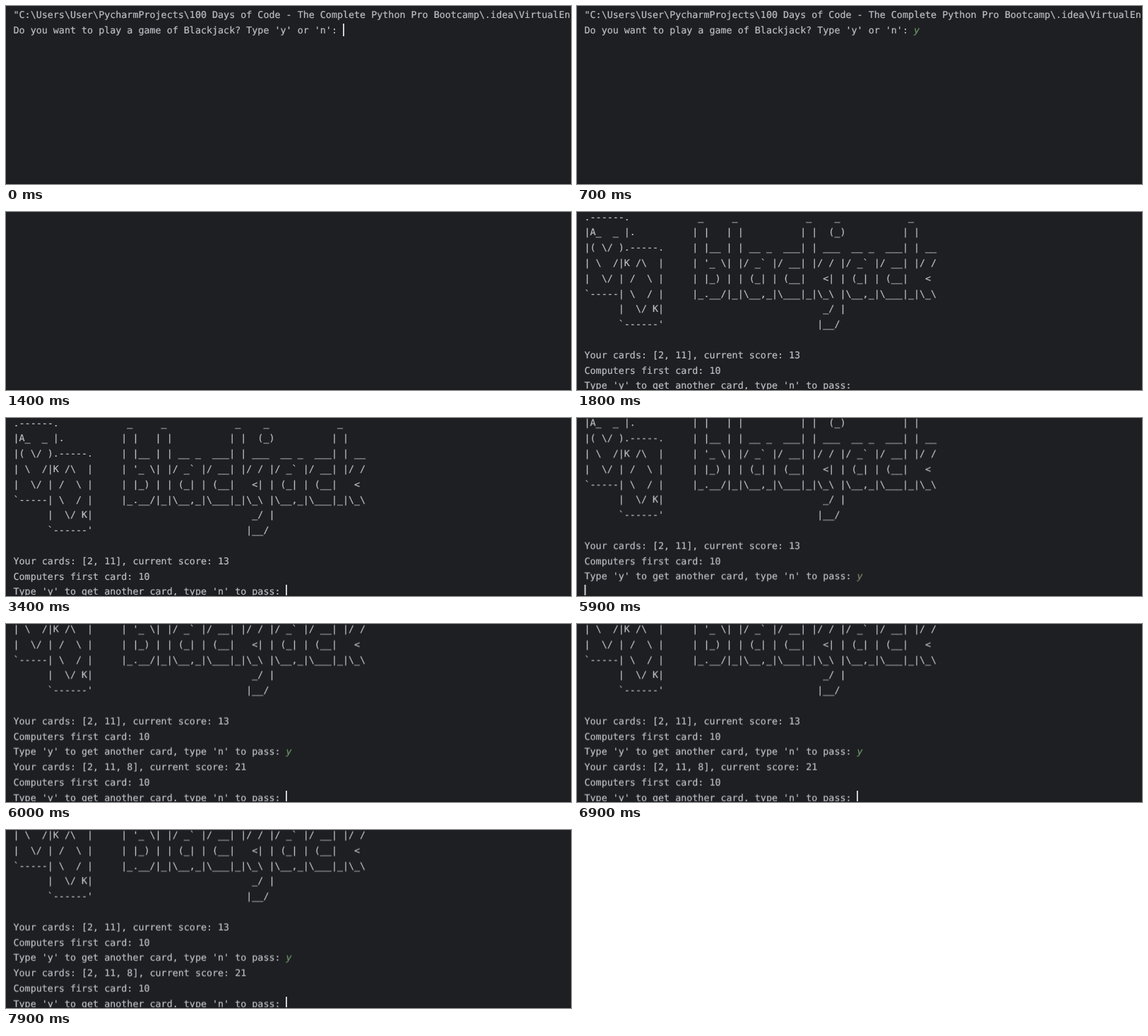
An HTML page for the animation above (8000 ms loop, 800 by 253 pixels).

```html
<!DOCTYPE html>
<html lang="en">
<head>
<meta charset="utf-8">
<title>Blackjack in a terminal</title>
<style>
  html, body {
    margin: 0;
    width: 100%;
    height: 100%;
    overflow: hidden;
    background: #1e1f22;
  }
  .stage {
    position: relative;
    width: 800px;
    height: 253px;
    overflow: hidden;
  }
  .stage::after {
    content: "";
    position: absolute;
    inset: 252px 0 0;
    background: #18191b;
  }
  pre {
    position: absolute;
    left: 10.5px;
    margin: 0;
    color: #bcbec4;
    font: 13.36px/21.78px "DejaVu Sans Mono", monospace;
    text-rendering: geometricPrecision;
    font-variant-ligatures: none;
    -webkit-text-stroke: 0.2px;
  }
  pre, .key, .reply, .caret {
    animation: 8s step-end infinite;
  }
  .key {
    color: #6a9a69;
    font-style: italic;
  }
  .caret {
    position: absolute;
    left: 0;
    top: 0;
    width: 2px;
    height: 18px;
    background: #ced0d6;
    animation-name: place, blink;
  }

  .prompt { top: 2.8px; animation-name: prompt; }
  .game { top: -2.3px; animation-name: game; }
  .prompt .key { animation-name: first-key; }
  .game .key { animation-name: second-key; }
  .reply { animation-name: reply; }

  @keyframes prompt {
    0% { opacity: 1; }
    17.5%, 100% { opacity: 0; }
  }
  @keyframes first-key {
    0% { opacity: 0; }
    2.5%, 100% { opacity: 1; }
  }
  /* the log scrolls by one row, then by two more */
  @keyframes game {
    0% { opacity: 0; transform: none; }
    20% { opacity: 1; transform: none; }
    73.75% { opacity: 1; transform: translateY(-21.78px); }
    75%, 100% { opacity: 1; transform: translateY(-65.34px); }
  }
  @keyframes second-key {
    0% { opacity: 0; color: #82856c; }
    61.25% { opacity: 1; color: #82856c; }
    75%, 100% { opacity: 1; color: #6a9a69; }
  }
  @keyframes reply {
    0% { opacity: 0; }
    75%, 100% { opacity: 1; }
  }
  @keyframes place {
    0% { transform: translate(477px, 25px); }
    2.5% { transform: translate(485px, 25px); }
    16.25% { transform: translate(10.5px, 47px); }
    20% { transform: translate(396px, 237px); }
    61.25% { transform: translate(404px, 237px); }
    73.75% { transform: translate(10.5px, 237px); }
    75%, 100% { transform: translate(396px, 237px); }
  }
  @keyframes blink {
    0%, 16.25%, 20%, 30%, 42.5%, 55%, 73.75%, 86.25%, 98.75%, 100% { opacity: 1; }
    8.75%, 17.5%, 22.5%, 36.25%, 50%, 65%, 77.5%, 92.5% { opacity: 0; }
  }
</style>
</head>
<body>
<div class="stage">
<pre class="prompt">"C:\Users\User\PycharmProjects\100 Days of Code - The Complete Python Pro Bootcamp\.idea\VirtualEn
Do you want to play a game of Blackjack? Type 'y' or 'n': <span class="key">y</span></pre>
<pre class="game">.------.            _     _            _    _            _
|A_  _ |.          | |   | |          | |  (_)          | |
|( \/ ).-----.     | |__ | | __ _  ___| | ___  __ _  ___| | __
| \  /|K /\  |     | '_ \| |/ _` |/ __| |/ / |/ _` |/ __| |/ /
|  \/ | /  \ |     | |_) | | (_| | (__|   &lt;| | (_| | (__|   &lt;
`-----| \  / |     |_.__/|_|\__,_|\___|_|\_\ |\__,_|\___|_|\_\
      |  \/ K|                            _/ |
      `------'                           |__/

Your cards: [2, 11], current score: 13
Computers first card: 10
Type 'y' to get another card, type 'n' to pass: <span class="key">y</span>
<span class="reply">Your cards: [2, 11, 8], current score: 21
Computers first card: 10
Type 'y' to get another card, type 'n' to pass: </span></pre>
<div class="caret"></div>
</div>
</body>
</html>
```
